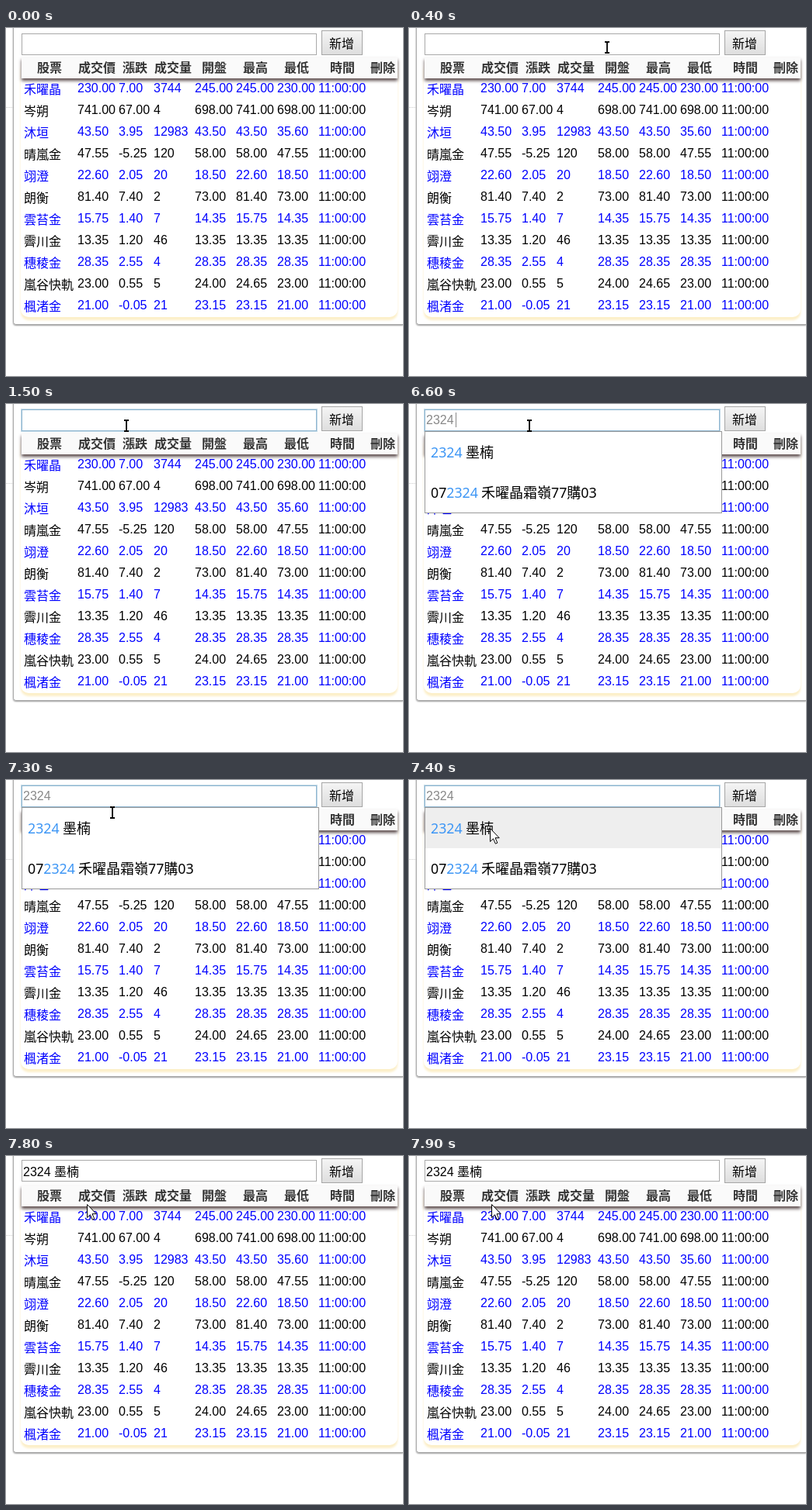
An HTML page for the animation above (8000 ms loop, 511 by 449 pixels).

```html
<!DOCTYPE html>
<html lang="zh-TW">
<head>
<meta charset="utf-8">
<title>股票清單</title>
<style>
html, body { margin: 0; width: 100%; height: 100%; overflow: hidden; background: #fff; }
div, svg { position: absolute; box-sizing: border-box; }
#stage { left: 0; top: 0; width: 100%; height: 100%; overflow: hidden; }
.label { font: 16px/0 "Liberation Sans", "Noto Sans CJK TC", "Noto Sans CJK JP", sans-serif; white-space: pre; }
/* A tall strut puts the text baseline exactly 100px below the label's top. */
.label::before { content: ""; display: inline-block; height: 100px; }
.center { width: 80px; margin-left: -40px; text-align: center; }
.head { font-weight: bold; color: #333; }
.digits { font: 17.75px/0 "Noto Sans", "Open Sans", sans-serif; }
.han { font-size: 18px; }
.match { color: #3d96f5; }
.panel { left: 9px; top: -20px; width: 502px; height: 403px; border: solid #aaa; border-width: 0 0 1px 1px; border-radius: 0 0 0 4px; box-shadow: 0 1px 2px #999; }
.dots { left: 0; top: 102px; width: 9px; border-top: 1px dotted #ccc; }
.table { left: 19px; top: 40px; width: 485px; height: 333px; border-radius: 10px; background: #fff; box-shadow: 0 4px 3px #fcefc8; }
.bar { left: 20px; top: 38px; width: 484px; height: 27px; background: #fafafa; box-shadow: 0 3px 4px #5a4a4a; }
.button { left: 406px; top: 3px; width: 53px; height: 32px; border: 1px solid #a6a6a6; background: linear-gradient(#f4f4f4, #dedede); }
#field, #focus { left: 20px; top: 7px; width: 380px; height: 28px; border: 1px solid #a9a9a9; background: #fff; }
#focus { border-color: #8db5d0; box-shadow: 0 0 0 1px #c3d9e6; }
#typed { color: #888; }
#caret { left: 0; top: 11px; width: 1px; height: 19px; background: #888; }
#menu { left: 20px; top: 35px; width: 383px; height: 106px; border: 1px solid #999; background: #fff; }
#hover { left: 0; top: 0; width: 381px; height: 52px; background: #eee; }
#pointer { left: 0; top: 0; overflow: visible; }
</style>
</head>
<body>
<div id="stage">
  <div class="panel"></div>
  <div class="dots"></div>
  <div class="table"></div>
  <div class="bar"></div>
  <div class="button"></div>
  <div id="labels"></div>
  <div id="field"></div>
  <div id="focus"></div>
  <div id="inputs"></div>
  <div id="caret"></div>
  <div id="menu"><div id="hover"></div></div>
  <svg id="pointer" width="1" height="1">
    <path id="arrow" d="M.5 .5V17.5L4.5 13.8L7.3 20.2L9.8 19.1L7 12.7H12.2Z" fill="#fff" stroke="#000"/>
    <g id="beam" fill="none">
      <path d="M-3 -7H-1L0 -6L1 -7H3M0 -6V6M-3 7H-1L0 6L1 7H3" stroke="#fff" stroke-width="3"/>
      <path d="M-3 -7H-1L0 -6L1 -7H3M0 -6V6M-3 7H-1L0 6L1 7H3" stroke="#000" stroke-width="1.8"/>
    </g>
  </svg>
</div>
<script>
const LOOP = 8000;
const byId = id => document.getElementById(id);

// Place text with its baseline at y.
function label(parent, x, y, html, { id = "", kind = "", color = "" } = {}) {
  const node = document.createElement("div");
  node.className = `label ${kind}`;
  if (id) node.id = id;
  Object.assign(node.style, { left: `${x}px`, top: `${y - 100}px`, color });
  node.innerHTML = html;
  byId(parent).append(node);
}

const columns = [23, 92, 145, 190, 243, 296, 349, 402];
const rows = [
  "禾曜晶 230.00 7.00 3744 245.00 245.00 230.00",
  "岑朔 741.00 67.00 4 698.00 741.00 698.00",
  "沐垣 43.50 3.95 12983 43.50 43.50 35.60",
  "晴嵐金 47.55 -5.25 120 58.00 58.00 47.55",
  "翊澄 22.60 2.05 20 18.50 22.60 18.50",
  "朗衡 81.40 7.40 2 73.00 81.40 73.00",
  "雲苔金 15.75 1.40 7 14.35 15.75 14.35",
  "霽川金 13.35 1.20 46 13.35 13.35 13.35",
  "穗稜金 28.35 2.55 4 28.35 28.35 28.35",
  "嵐谷快軌 23.00 0.55 5 24.00 24.65 23.00",
  "楓渚金 21.00 -0.05 21 23.15 23.15 21.00"
];
rows.forEach((row, r) => `${row} 11:00:00`.split(" ").forEach((cell, c) =>
  label("labels", columns[c], (c ? 83 : 85) + 28 * r, cell, { color: r % 2 ? "#000" : "#00f" })));

const centers = [56, 117, 166, 215, 268, 321, 374, 433, 485];
"股票 成交價 漲跌 成交量 開盤 最高 最低 時間 刪除".split(" ")
  .forEach((title, i) => label("labels", centers[i], 57, title, { kind: "center head" }));
label("labels", 432, 26, "新增", { kind: "center" });

label("inputs", 22, 26, "2324", { id: "typed" });
label("inputs", 22, 26, "2324", { id: "entered" });
label("inputs", 22, 26, "2324 墨楠", { id: "chosen" });

// Menu labels are placed relative to the inside of its border.
label("menu", 7, 33, "2324", { kind: "digits match" });
label("menu", 52, 33, "墨楠", { kind: "han" });
label("menu", 7, 85, '07<span class="match">2324</span>', { kind: "digits" });
label("menu", 72, 85, '禾曜晶霜嶺<span class="digits">77</span>購<span class="digits">03</span>', { kind: "han" });

// Hold each value from its time until the next one.
function hold(id, property, steps) {
  const frames = steps.map(([time, value]) =>
    ({ offset: time / LOOP, [property]: value, easing: "step-end" }));
  frames.push({ offset: 1, [property]: steps.at(-1)[1] });
  byId(id).animate(frames, { duration: LOOP, iterations: Infinity });
}

// Show an element only within the given [from, to] spans.
function show(id, ...spans) {
  const steps = spans.flatMap(([from, to]) =>
    to < LOOP ? [[from, "visible"], [to, "hidden"]] : [[from, "visible"]]);
  if (steps[0][0] > 0) steps.unshift([0, "hidden"]);
  hold(id, "visibility", steps);
}

const move = (id, path) =>
  hold(id, "transform", path.map(([time, x, y]) => [time, `translate(${x}px, ${y}px)`]));

show("focus", [1000, 7700]);
show("caret", [1000, 1500], [6600, 7100]);
move("caret", [[0, 23, 0], [6600, 60, 0]]);
show("typed", [6600, 7700]);
show("entered", [7700, 7800]);
show("chosen", [7800, LOOP]);
move("field", [[0, 0, 0], [7800, 0, -2]]);
show("menu", [6600, 7800]);
show("hover", [7400, 7800]);

show("arrow", [100, 300], [7400, LOOP]);
show("beam", [300, 7400]);
move("pointer", [
  [0, 491, -30], [100, 491, 3], [200, 416, 12], [300, 330, 20], [400, 255, 25],
  [500, 200, 27], [600, 168, 28], [700, 155, 28], [7300, 137, 42],
  [7400, 104, 62], [7900, 106, 62]
]);
</script>
</body>
</html>
```
